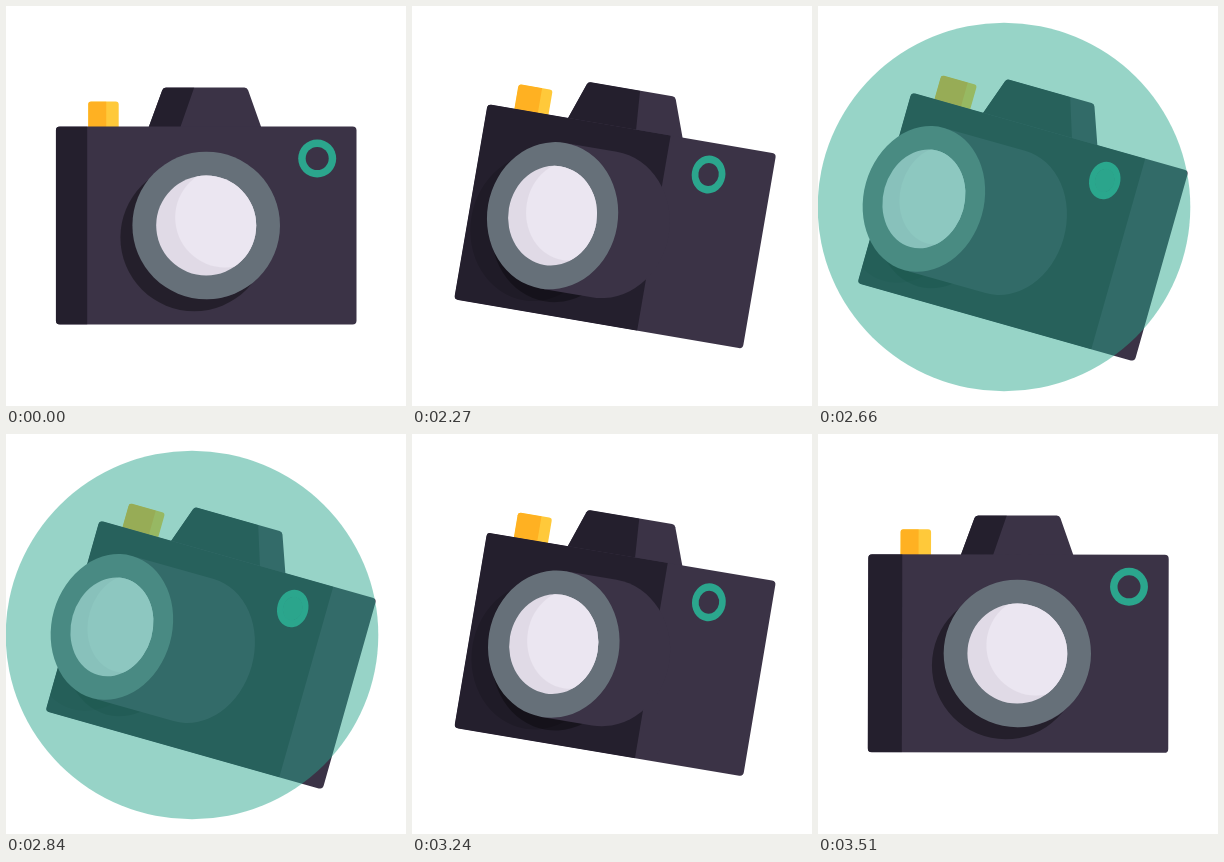
These frames come from a looping animation (400x400 px, 3540 ms). An HTML page with a canvas:

```html
<!DOCTYPE html>
<html lang="en">
<head>
<meta charset="utf-8">
<title>Camera flash</title>
<style>
  html, body { margin: 0; width: 100%; height: 100%; overflow: hidden; background: #fff; }
  canvas { display: block; width: 100vw; height: 100vh; }
</style>
</head>
<body>
<canvas id="stage"></canvas>
<script>
const SIZE = 400, LOOP = 3540;
const LIGHT = '#3b3346', DARK = '#241f2d', RING = '#667079', TEAL = '#2ba68d';
const canvas = document.getElementById('stage');
const ctx = canvas.getContext('2d');
const ratio = window.devicePixelRatio || 1;
canvas.width = canvas.height = SIZE * ratio;

const mix = (a, b, k) => a + (b - a) * k;
const smooth = (t, from, to) => {
  const x = Math.min(1, Math.max(0, (t - from) / (to - from)));
  return x * x * (3 - 2 * x);
};
const turnAt = t => smooth(t, 2005, 2465) * (1 - smooth(t, 3015, 3540));
// Two soft blinks while the camera is turned
const flashAt = t => t < 2550 || t > 2950 ? 0 : Math.sin((t - 2550) / 200 * Math.PI) ** 2;

function fill(color, alpha = 1) {
  ctx.globalAlpha = alpha;
  ctx.fillStyle = color;
  ctx.fill();
  ctx.globalAlpha = 1;
}

function ellipse(x, y, rx, ry, color, alpha) {
  ctx.beginPath();
  ctx.ellipse(x, y, rx, ry, 0, 0, Math.PI * 2);
  fill(color, alpha);
}

function polygon(points, color) {
  ctx.beginPath();
  points.forEach(([x, y]) => ctx.lineTo(x, y));
  ctx.closePath();
  fill(color);
}

function roundRect(x, y, w, h, radii) {
  ctx.beginPath();
  ctx.roundRect(x, y, w, h, radii);
}

function clipped(draw) {
  ctx.save();
  ctx.clip();
  draw();
  ctx.restore();
}

function drawShutter(p) {
  const left = mix(-118, -120, p), split = mix(-100, -92.5, p), right = mix(-87.5, -82.8, p);
  roundRect(left, -124, right - left, 27, [3, 3, 0, 0]);
  fill('#ffc93a');
  clipped(() => {
    ctx.fillStyle = '#ffb122';
    ctx.fillRect(left, -124, split - left, 27);
  });
}

function drawPrism(p) {
  const bl = mix(-58, -70, p), tl = mix(-43, -56, p);
  const tr = mix(41, 35, p), br = mix(55.5, 50, p);
  const top = -138;
  ctx.beginPath();
  ctx.moveTo(bl, -97);
  ctx.arcTo(tl, top, tr, top, 4);
  ctx.arcTo(tr, top, br, -97, 4);
  ctx.lineTo(br, -97);
  ctx.closePath();
  fill(LIGHT);
  clipped(() => polygon([
    [-90, -97], [-90, top], [mix(-12, 10, p), top], [mix(-26, 23.2, p), -98]
  ], DARK));
}

function drawBody(p, lensX, squeeze) {
  const half = mix(150.3, 144, p), height = 198;
  const shade = -119 + 319 * p - 101 * p * p;
  const rx = 73.8 * squeeze;
  roundRect(-half, -99, half * 2, height, 4);
  fill(LIGHT);
  clipped(() => {
    ctx.fillStyle = DARK;
    ctx.fillRect(-half, -99, shade + half, height);
    ellipse(lensX - 12 - 4 * p, mix(12, 16, p), rx, 73.8, '#000', 0.14 * Math.min(1, p * 2));
    ellipse(lensX - 12 + 30 * p, 12, rx, 73.8, '#000', mix(0.39, 0.28, p));
  });
}

function drawLens(p, x, squeeze) {
  const base = -18 * p, r = 73.8, inner = 50;
  ctx.beginPath();
  ctx.moveTo(x, -r);
  ctx.lineTo(base, -r);
  ctx.ellipse(base, 0, r * squeeze, r, 0, -Math.PI / 2, Math.PI / 2);
  ctx.lineTo(x, r);
  ctx.closePath();
  fill(LIGHT);
  ellipse(x, 0, r * squeeze, r, RING);
  ellipse(x, 0, inner * squeeze, inner, '#e0dae6');
  clipped(() => ellipse(x + 19 * squeeze, -8, inner * squeeze, inner, '#ebe6f1'));
}

function drawLamp(p, squeeze, flash) {
  const x = mix(111, 66, p), y = -67;
  ellipse(x, y, 19 * squeeze, 19, TEAL);
  ellipse(x, y, 11.5 * squeeze, 11.5, LIGHT);
  if (flash) ellipse(x, y, 12 * squeeze, 12, TEAL, flash);
}

function draw(t) {
  const p = turnAt(t), flash = flashAt(t);
  const lensX = -103 * p, squeeze = 1 - 0.185 * p;
  ctx.setTransform(ratio, 0, 0, ratio, 0, 0);
  ctx.fillStyle = '#fff';
  ctx.fillRect(0, 0, SIZE, SIZE);

  ctx.save();
  ctx.translate(200.2 + 4.8 * p, 219.5 + 1.5 * p);
  ctx.rotate(15.8 * p * Math.PI / 180);
  drawShutter(p);
  drawPrism(p);
  drawBody(p, lensX, squeeze);
  drawLens(p, lensX, squeeze);
  drawLamp(p, squeeze, flash);
  ctx.restore();

  if (flash) ellipse(186, 201, 186.3, 184.2, TEAL, flash * 0.5);
}

const start = performance.now();
function tick() {
  draw((performance.now() - start) % LOOP);
  requestAnimationFrame(tick);
}
tick();
</script>
</body>
</html>
```
